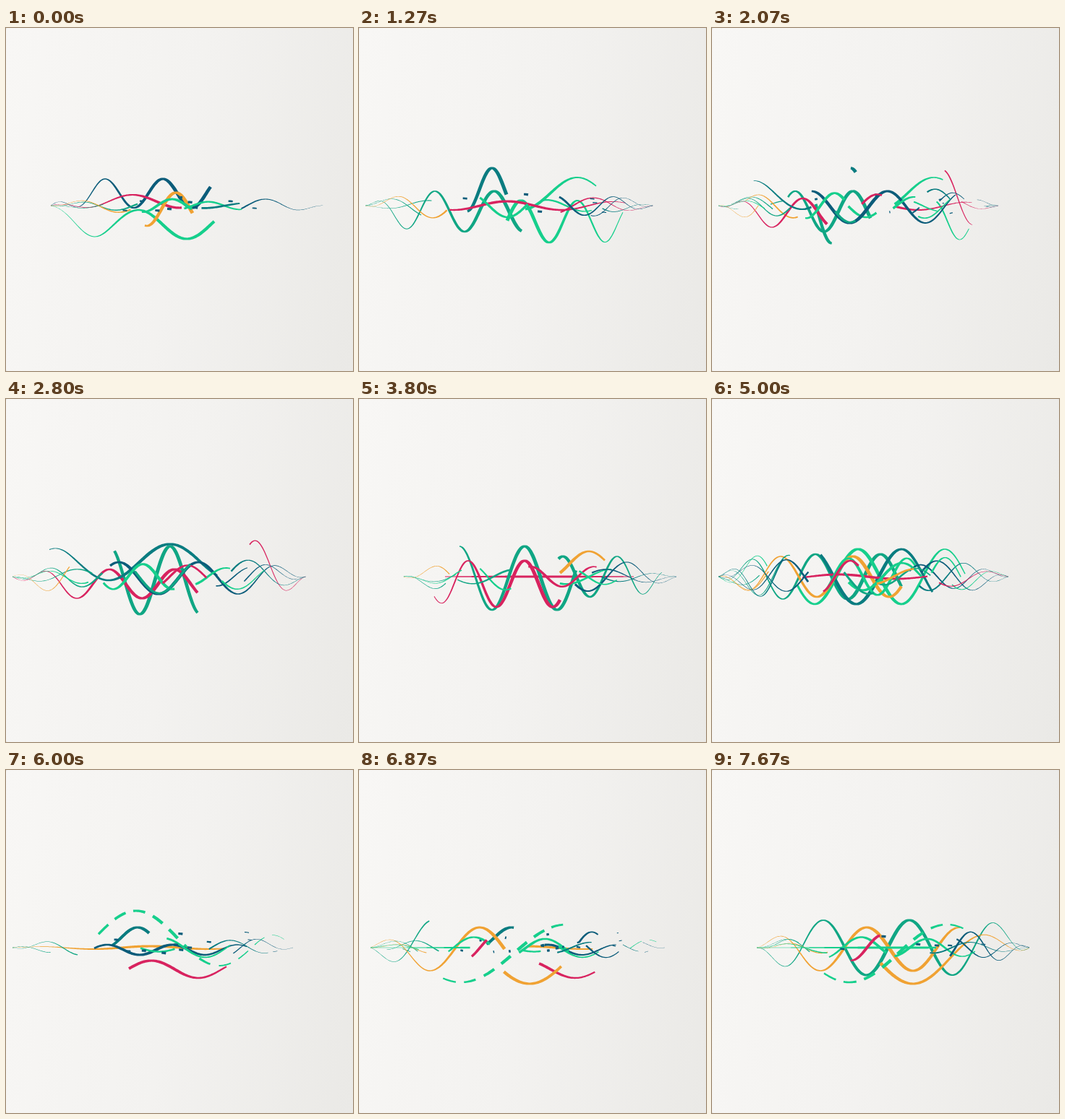
These frames come from a looping animation (480 px wide and 475 px high, 7.74 s). An HTML page with a canvas:

```html
<!DOCTYPE html>
<html>
<head>
<meta charset="utf-8">
<style>
html, body { margin: 0; width: 100%; height: 100%; overflow: hidden; background: #dddcda; }
canvas { display: block; width: 480px; height: 475px; border-radius: 2px; background: linear-gradient(100deg, #f8f7f5, #f3f2f0 50%, #eae9e6); }
</style>
</head>
<body>
<canvas id="stage" width="480" height="475"></canvas>
<script>
const ctx = document.getElementById('stage').getContext('2d');
const COLORS = { navy: '#0b5c7a', deep: '#0a7c80', teal: '#10a684', green: '#16cf8c', pink: '#d8235f', gold: '#f0a233' };
const MIX = ['teal', 'green', 'navy', 'teal', 'green', 'deep', 'gold', 'pink', 'navy', 'green'];
const FPS = 15, LOOP = 7740, LAST = 115, MID = 246, KNOT = 128, END = 480;

const clamp = v => Math.max(0, Math.min(1, v));
const mix = (a, b, k) => a + (b - a) * k;
const quarter = k => Math.sin(clamp(k) * Math.PI / 2);

function seeded(seed) {
  return () => {
    const v = Math.sin(seed++ * 127.1) * 43758.5453;
    return v - Math.floor(v);
  };
}

// Both tips sway twice per loop
function tipsAt(step) {
  const c = Math.cos(step / LAST * 4 * Math.PI);
  return [9 + 53 * Math.max(0, c) ** 1.5, 417 + 22 * c];
}

// One piece of a sine wave; 0 and END reach as far as the tips
const wave = (color, from, to, crest, length, amp, bias = 0) =>
  ({ color, from, to, crest, length, amp, bias, weight: 1, dashed: false });
const dashed = (...args) => ({ ...wave(...args), dashed: true });

// Each pose: leading waves, then seeded filler of a given count, height and number of loose bits
function pose(step, filler, height, bits, ...waves) {
  const rnd = seeded(step + 5), pick = (a, b) => mix(a, b, rnd());
  const tips = tipsAt(step), strands = [...waves];
  for (let i = 0; i < filler; i++) {
    const length = pick(80, 130), side = rnd() < 0.5 ? -1 : 1, size = pick(40, 125);
    const from = i % 3 === 0 ? 0 : i % 3 === 1 ? pick(120, 280) : pick(270, 345);
    const to = from ? from + size : tips[0] + size;
    strands.push({
      ...wave(MIX[i % MIX.length], from, to > 365 ? END : to, KNOT + side * length / 4, length, pick(0.25, 1) * height),
      weight: pick(0.65, 0.95)
    });
  }
  for (let i = 0; i < bits; i++) {
    const x = pick(140, 375);
    strands.push(wave('navy', x, x + 6, x, 50, 2, pick(-20, 12)));
  }
  return { step, tips, strands };
}

const POSES = [
  pose(0, 7, 11, 9,
    wave('navy', 0, 283, 217, 80, 20, -17),
    wave('green', 0, 288, 183, 134, 20, 26),
    wave('pink', 0, 243, 175, 130, 9, -6),
    wave('gold', 192, 258, 235, 80, 23, 5)),
  pose(19, 9, 20, 6,
    wave('deep', 150, 204, 184, 70, 30, -22),
    wave('teal', 0, 225, 187, 82, 28, 8),
    wave('green', 205, 365, 302, 78, 29, 22),
    wave('green', 230, 328, 302, 150, 22, -17),
    wave('pink', 125, 369, 205, 150, 6)),
  pose(42, 12, 26, 0,
    wave('teal', 150, 265, 227, 84, 47, 5),
    wave('pink', 0, 265, 143, 90, 20, 10),
    wave('deep', 60, 292, 227, 170, 25, -20),
    wave('navy', 144, END, 266, 110, 22, 2),
    wave('pink', 337, END, 345, 100, 45, -5)),
  pose(57, 12, 24, 0,
    wave('pink', 119, 380, 200, 200, 0),
    wave('teal', 139, 300, 229, 90, 44, 2),
    wave('pink', 104, 278, 229, 78, 32, 10),
    wave('teal', 276, 419, 357, 75, 28),
    wave('gold', 278, 340, 318, 110, 18, -17)),
  pose(75, 19, 36, 0,
    wave('teal', 0, 262, 143, 90, 31),
    wave('green', 118, 350, 202, 120, 38),
    wave('deep', 150, 305, 262, 125, 38),
    wave('gold', 0, 262, 95, 100, 28),
    wave('pink', 125, 298, 175, 160, 3)),
  pose(90, 6, 17, 12,
    dashed('green', 128, 386, 180, 230, 38, -13),
    wave('pink', 170, 305, 201, 130, 12, 30),
    wave('gold', 0, 302, 200, 160, 2),
    wave('deep', 147, 198, 182, 90, 14, -14),
    wave('navy', 122, 333, 230, 90, 7, 3)),
  pose(115, 10, 24, 6,
    wave('teal', 0, END, 273, 119, 38),
    wave('gold', 0, 343, 214, 128, 30, 2),
    wave('gold', 233, END, 378, 200, 34, 16),
    dashed('green', 155, 355, 325, 270, 40, 8),
    wave('green', 0, 310, 200, 200, 0))
];

// Ribbon that swells in the middle of the stage and on steep stretches
function ribbon(pts, [left, right], weight) {
  if (pts.length < 2) return;
  const top = [], low = [];
  pts.forEach(([x, y], i) => {
    const a = pts[Math.max(0, i - 1)], b = pts[Math.min(pts.length - 1, i + 1)];
    const dx = b[0] - a[0], dy = b[1] - a[1], len = Math.hypot(dx, dy) || 1;
    const swell = Math.sin(Math.PI * clamp((x - left) / (right - left))) ** 2;
    const h = weight * (0.5 + 4.4 * swell) * (0.65 + 0.4 * Math.abs(dy) / len) / 2;
    top.push([x - dy / len * h, y + dx / len * h]);
    low.unshift([x + dy / len * h, y - dx / len * h]);
  });
  ctx.beginPath();
  top.concat(low).forEach(p => ctx.lineTo(...p));
  ctx.fill();
}

function dashes(pts, tips, weight) {
  let run = [], dist = 0;
  pts.forEach((p, i) => {
    if (i) dist += Math.hypot(p[0] - pts[i - 1][0], p[1] - pts[i - 1][1]);
    if (dist % 29 < 19) run.push(p);
    else { ribbon(run, tips, weight); run = []; }
  });
  ribbon(run, tips, weight);
}

function drawPose(p, index, step, tips) {
  const dt = step - p.step, next = POSES[index + Math.sign(dt)];
  const phase = dt && next ? dt / Math.abs(next.step - p.step) : 0;
  if (Math.abs(phase) >= 1) return;
  const [left, right] = p.tips;

  p.strands.forEach((s, i) => {
    // Strands grow from the left before their pose and are wiped away from the left after it
    const delay = (i * 0.618) % 1 * 0.4;
    const gone = clamp((Math.abs(phase) - delay) / 0.6);
    let from = Math.max(s.from, left), to = Math.min(s.to, right);
    if (phase < 0) to = mix(to, from, gone);
    else from = mix(from, to, gone);
    if (to - from < 1) return;

    const count = Math.ceil((to - from) / 1.5), pts = [];
    for (let j = 0; j <= count; j++) {
      const x = mix(from, to, j / count), u = (x - left) / (right - left);
      const open = quarter(u / 0.2) * quarter((1 - u) / 0.18);
      const turn = (x - s.crest - 25 * phase) / s.length * 2 * Math.PI;
      pts.push([mix(...tips, u), MID + open * (s.bias - s.amp * Math.cos(turn))]);
    }
    ctx.fillStyle = COLORS[s.color];
    (s.dashed ? dashes : ribbon)(pts, tips, s.weight);
  });
}

function frame() {
  const step = Math.min(LAST, Math.floor(performance.now() % LOOP / 1000 * FPS + 0.05));
  const tips = tipsAt(step);
  ctx.clearRect(0, 0, END, 475);
  POSES.forEach((p, i) => drawPose(p, i, step, tips));
  requestAnimationFrame(frame);
}
frame();
</script>
</body>
</html>
```
